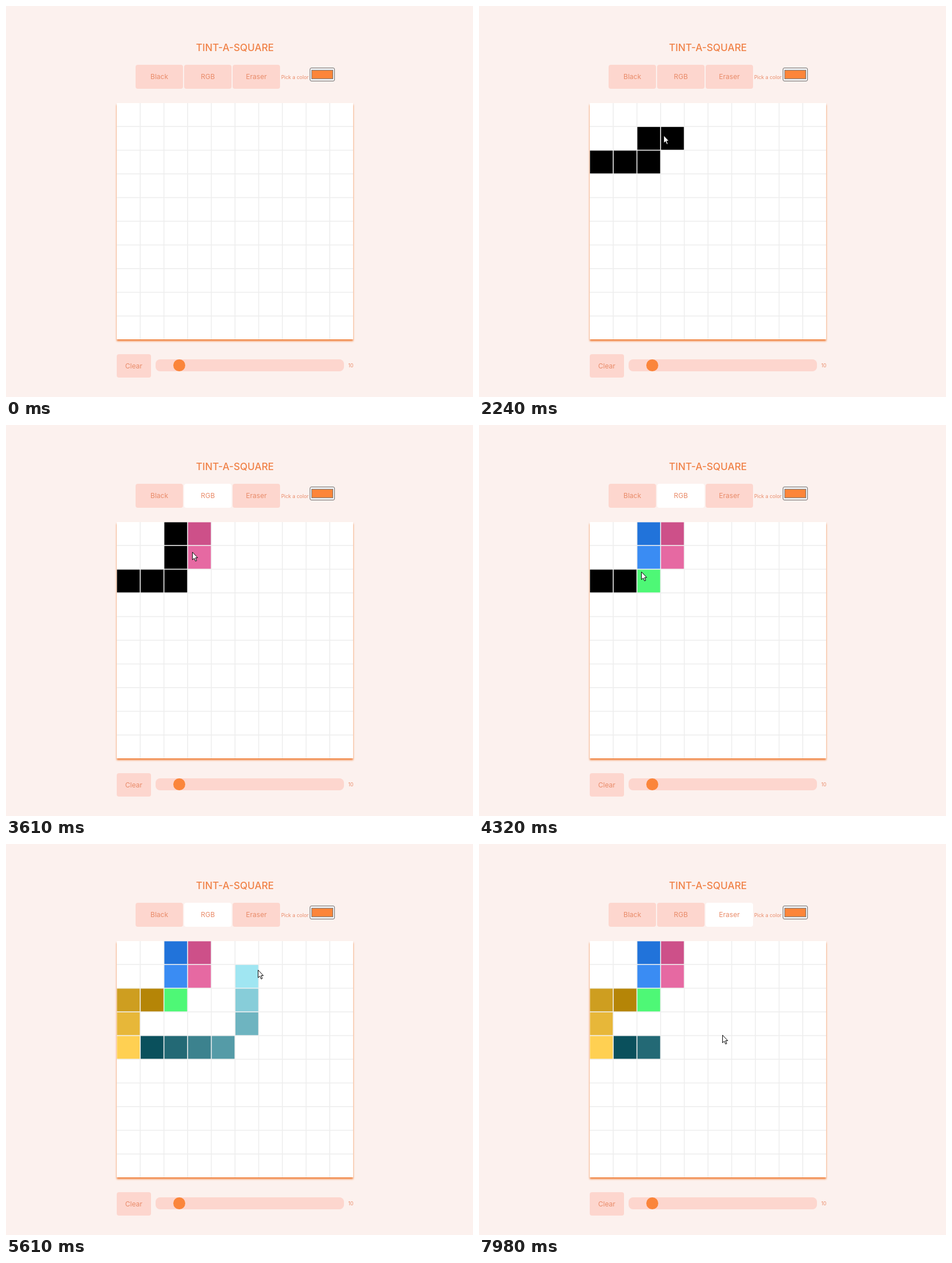
An HTML page with a canvas that plays this animation: 818x685 px, repeating every 8 s.

```html
<!DOCTYPE html>
<html lang="en">
<head>
<meta charset="utf-8">
<title>Drawing grid</title>
<style>
  html, body { margin: 0; width: 100%; height: 100%; overflow: hidden; background: #fcf1ee; }
  body { position: relative; color: #e98b69; font: 12px Inter, "Open Sans", sans-serif; }
  body * { position: absolute; box-sizing: border-box; }
  h1 { left: 201px; top: 61px; width: 400px; margin: 0; color: #f08248; font-size: 17.2px; font-weight: 500; line-height: 24px; text-align: center; }
  .button { top: 103px; width: 83px; height: 41.5px; border-radius: 4px; background: #fdd6ce; line-height: 42px; text-align: center; }
  .small { font-size: 8.7px; line-height: 12px; white-space: nowrap; }
  #picker { left: 532px; top: 108px; width: 43.5px; height: 24px; border: 1px solid #6f6f6f; border-radius: 3px; background: #f3f1f1; }
  #picker i { left: 2px; top: 3px; width: 38px; height: 16px; border: 1px solid #777; background: #fd853a; }
  #board { left: 194px; top: 170px; background: #fff; box-shadow: 0 3px 3px #f0803c; }
  #track { left: 261.5px; top: 619px; width: 330.5px; height: 21px; border-radius: 8px; background: #fdd6ce; }
  #thumb { left: 31.5px; top: 0; width: 21px; height: 21px; border-radius: 50%; background: #fb853b; }
  #cursor { left: 0; top: 0; width: 12px; height: 19px; }
</style>
</head>
<body>
<h1>TINT-A-SQUARE</h1>
<div class="button" style="left:227px">Black</div>
<div class="button" id="rgb" style="left:312px">RGB</div>
<div class="button" id="eraser" style="left:397px">Eraser</div>
<div class="small" style="left:482px;top:119px">Pick a color</div>
<div id="picker"><i></i></div>
<canvas id="board" width="414" height="414"></canvas>
<div class="button" style="left:194px;top:609.5px;width:59.5px">Clear</div>
<div id="track"><div id="thumb"></div></div>
<div class="small" style="left:599.5px;top:624px">10</div>
<svg id="cursor" viewBox="0 0 12 19">
  <path d="M.6 .8V14.2L3.7 11.4 5.9 16.5 8 15.6 5.9 10.6H9.8Z" fill="#fff" stroke="#000" stroke-linejoin="round"/>
</svg>
<script>
const LOOP = 8000, PITCH = 41.5, COUNT = 10, SUBSTEPS = 4;
const RGB_CLICK = 2880, PEN_UP = 5650, ERASER_CLICK = 6230, FADE = 90;
const byId = id => document.getElementById(id);
const ctx = byId('board').getContext('2d');

// Each stroke of the mouse starts where the one before ended.
const entry = [-40, 380];
const moves = [
  { from: 1270, to: 1840, steps: 8, path: [[125, 318], [205, 288], [240, 286]] },
  { from: 2000, to: 2730, steps: 10, path: [[283, 262], [323, 226], [311, 195], [345, 140], [386, 109]] },
  { from: 3220, to: 3840, steps: 9, path: [[350, 178], [326, 222], [297, 203]] },
  { from: 4080, to: 4810, steps: 10, path: [[295, 250], [240, 283], [213, 298]] },
  { from: 4890, to: 5190, steps: 5, path: [[237, 354], [366, 361]] },
  { from: 5360, to: 6060, steps: 10, path: [[418, 324], [441, 220], [458, 165], [470, 125], [473, 109]] },
  { from: 6550, to: 7350, steps: 11, path: [[461, 181], [430, 225], [428, 270], [418, 310], [396, 320]] },
  { from: 7420, to: 7980, steps: 8, path: [[350, 350], [380, 350], [426, 334]] }
];

// The RGB pen lightens its colour by 25 per cell and takes a new base when a channel would overflow.
const bases = [[205, 80, 137], [33, 115, 218], [78, 248, 118], [181, 133, 7], [10, 80, 92], [10, 98, 38]];
function* rgbPen() {
  for (const base of bases)
    for (let add = 0; Math.max(...base) + add <= 256; add += 25)
      yield `rgb(${base.map(v => v + add)})`;
}

function pointOn(path, u) {
  const s = u * (path.length - 1), i = Math.min(Math.floor(s), path.length - 2);
  return path[i].map((v, axis) => v + (path[i + 1][axis] - v) * (s - i));
}

function cellAt([x, y]) {
  const col = Math.floor((x - 193.8) / PITCH), row = Math.floor((y - 170) / PITCH);
  return col >= 0 && col < COUNT && row >= 0 && row < COUNT ? `${col},${row}` : null;
}

// Drag the pen along every path and keep the picture after each mouse step.
function recordSteps() {
  const pen = rgbPen(), history = [{ time: 0, tip: null, cells: {} }];
  let cells = {}, current = null, rest = entry;
  for (const { from, to, steps, path } of moves) {
    const full = [rest, ...path];
    for (let i = 0; i < steps; i++) {
      const time = from + (to - from) * Math.max(0, i - 0.2) / (steps - 1);
      cells = { ...cells };
      for (let sub = 1; sub <= SUBSTEPS; sub++) {
        const cell = cellAt(pointOn(full, (i + sub / SUBSTEPS) / steps));
        if (cell && cell !== current) {
          if (time < RGB_CLICK) cells[cell] = '#000';
          else if (time < PEN_UP) cells[cell] = pen.next().value;
          else if (time > ERASER_CLICK) delete cells[cell];
        }
        current = cell;
      }
      history.push({ time, tip: pointOn(full, (i + 1) / steps), cells });
    }
    rest = path[path.length - 1];
  }
  return history;
}

function drawBoard(cells) {
  ctx.clearRect(0, 0, 414, 414);
  ctx.fillStyle = '#eee';
  for (let k = 1; k < COUNT; k++) {
    ctx.fillRect(k * PITCH - 1.2, 0, 1.6, 414);
    ctx.fillRect(0, k * PITCH - 1.2, 414, 1.6);
  }
  for (const cell in cells) {
    const [col, row] = cell.split(',');
    ctx.fillStyle = cells[cell];
    ctx.fillRect(col * PITCH + 0.4, row * PITCH + 0.4, 39.9, 39.9);
  }
}

function setActive(id, amount) {
  byId(id).style.background = `rgb(${[253, 214, 206].map(v => v + (255 - v) * amount)})`;
}

// A clicked button turns white in two steps.
const clicked = (t, at) => t < at ? 0 : t < at + FADE ? 0.5 : 1;
const history = recordSteps();

function render(t) {
  const { tip, cells } = history.findLast(step => step.time <= t);
  drawBoard(cells);
  cursor.style.display = tip ? '' : 'none';
  if (tip) cursor.style.transform = `translate(${tip[0]}px,${tip[1]}px)`;
  const erasing = clicked(t, ERASER_CLICK);
  setActive('rgb', clicked(t, RGB_CLICK) - erasing);
  setActive('eraser', erasing);
}

const cursor = byId('cursor');
const start = performance.now();
function tick() {
  render((performance.now() - start) % LOOP);
  requestAnimationFrame(tick);
}
tick();
</script>
</body>
</html>
```
